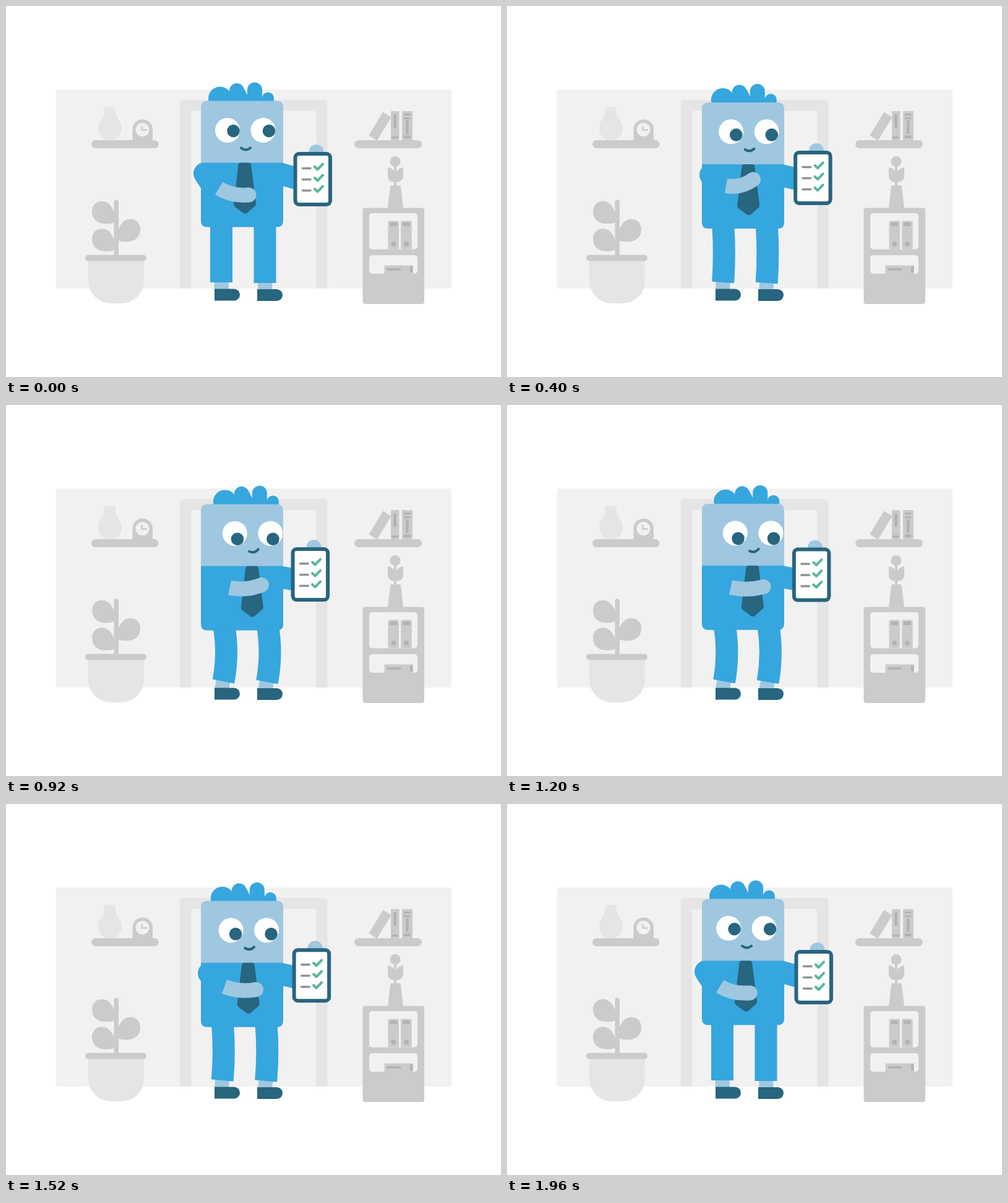
Animation of 800 by 600 pixels, one loop 2000 ms. Source, as an HTML page:

```html
<!DOCTYPE html>
<html lang="en">
<head>
<meta charset="utf-8">
<title>Checklist</title>
<style>
  html, body { margin: 0; width: 100%; height: 100%; overflow: hidden; background: #fff; }
  svg { display: block; width: 800px; height: 600px; }
  .panel { fill: #f1f1f1; }
  .pale { fill: #e5e5e5; }
  .gray { fill: #cbcbcb; }
  .deep { fill: #b3b3b3; }
  .blue { fill: #36a6de; }
  .skin { fill: #9fc7e0; }
  .dark { fill: #28657f; }
  .white { fill: #fff; }
  .line { fill: none; }
  .blue.line { stroke: #36a6de; stroke-width: 36; fill: none; }
  .skin.line { stroke: #9fc7e0; stroke-width: 24; fill: none; }
  .round { stroke-linecap: round; stroke-linejoin: round; }
</style>
</head>
<body>
<svg viewBox="0 0 800 600">
  <!-- room -->
  <rect class="panel" x="80.5" y="135" width="639.5" height="322" rx="4"/>
  <path class="pale" d="M281 457V158q0-6 6-6H513.500q6 0 6 6V457H501.500V175q0-5.500-5.500-5.500H304.500q-5.500 0-5.500 5.500V457Z"/>

  <!-- left shelf -->
  <rect class="gray" x="138" y="217" width="108.500" height="13" rx="6.500"/>
  <path class="pale" d="M158.500 163.500H177V174C178 181 187 186 187 198C187 210 178 217.500 168 217.500S149 210 149 198C149 186 157.500 181 158.500 174Z"/>
  <path class="gray" d="M204.500 217V199.700a16.250 16.250 0 0 1 32.500 0V217Z"/>
  <circle class="panel" cx="220.500" cy="200" r="11"/>
  <path class="line" stroke="#cbcbcb" stroke-width="2.500" d="M219.500 194V200.500H228"/>

  <!-- potted plant -->
  <rect class="gray" x="174.500" y="313.500" width="7.500" height="95" rx="3.500"/>
  <g class="gray">
    <path id="leaf" d="M176.500 349C166 355 139 355 139 332C139 318 152 313 162 317C172 322 177 335 176.500 349Z"/>
    <use href="#leaf" y="44.500"/>
    <use href="#leaf" transform="translate(356 29) scale(-1 1)"/>
  </g>
  <path class="pale" d="M133 410H223V444a37 37 0 0 1-37 37H170a37 37 0 0 1-37-37Z"/>
  <rect class="gray" x="128" y="402.500" width="99" height="10" rx="5"/>

  <!-- right shelf -->
  <g class="gray">
    <rect x="563" y="217" width="109" height="13" rx="6.500"/>
    <path d="M609.500 172L622 180L599.500 217L587 209Z" stroke="#cbcbcb" stroke-linejoin="round"/>
    <rect x="622" y="170" width="13.500" height="47" rx="1"/>
    <rect x="640" y="170" width="17" height="47" rx="1"/>
  </g>
  <g class="deep">
    <rect x="626" y="175" width="5" height="22" rx="2"/>
    <rect x="623" y="211" width="11" height="3.500"/>
    <rect x="643" y="174" width="10.500" height="3"/>
    <rect x="643" y="180" width="10.500" height="3"/>
    <rect x="646" y="185" width="4.500" height="22"/>
    <rect x="643" y="209.500" width="10.500" height="4.500"/>
  </g>

  <!-- cabinet -->
  <g class="gray">
    <circle cx="629" cy="251.500" r="8.500"/>
    <rect x="627" y="255" width="4" height="37"/>
    <path d="M617 261C624 262 628 266 629.500 273C631 266 635 262 642 261V275C642 282 636 285 629.500 285S617 282 617 275Z"/>
    <path d="M623 290H636q1.500 0 2 2L642 327H617L621 292q.500-2 2-2Z"/>
    <rect x="576.500" y="326.500" width="99.500" height="155.500" rx="4"/>
  </g>
  <rect class="panel" x="587" y="335" width="78" height="58.500" rx="5"/>
  <rect class="panel" x="587" y="403" width="78" height="30" rx="5"/>
  <g id="binder">
    <rect class="gray" x="617.500" y="347.500" width="17.500" height="46" rx="2"/>
    <rect class="deep" x="620.500" y="350" width="11.500" height="6" rx="1"/>
    <circle class="deep" cx="626.300" cy="385" r="4"/>
  </g>
  <use href="#binder" x="20.700"/>
  <rect class="gray" x="611.500" y="419.500" width="46.500" height="14"/>
  <rect class="deep" x="616" y="424" width="22" height="4"/>
  <rect class="deep" x="653" y="421" width="4" height="10"/>

  <!-- character -->
  <path id="ankleL" class="skin line" style="stroke-width:23"/>
  <path id="ankleR" class="skin line" style="stroke-width:23"/>
  <path id="legL" class="blue line"/>
  <path id="legR" class="blue line"/>
  <path id="shoe" class="dark" d="M337 457.500H368.500a9.500 9.500 0 0 1 0 19H337Z"/>
  <use href="#shoe" x="69" y=".5"/>

  <path id="armL" class="blue line round"/>
  <path id="armR" class="blue line round"/>
  <g id="hair" class="blue">
    <circle cx="346" cy="149.500" r="19"/>
    <path class="blue line round" style="stroke-width:24" d="M373 137L385 160M402 135.500V158"/>
    <path class="blue line round" style="stroke-width:19" d="M423.500 149V160"/>
    <rect x="345" y="147" width="70" height="14"/>
  </g>
  <g id="body">
    <path class="blue" d="M315 252H448V347.500q0 10-10 10H325q-10 0-10-10Z"/>
    <path class="skin" d="M315 253.500V163.500q0-10 10-10H438q10 0 10 10V253.500Z"/>
  </g>
  <g id="eyes" class="white">
    <circle cx="358" cy="201" r="20"/>
    <circle cx="415.500" cy="201" r="20"/>
  </g>
  <g id="pupils" class="dark">
    <circle cx="367.500" cy="202" r="10.300"/>
    <circle cx="425" cy="202" r="10.300"/>
  </g>
  <path id="smile" class="line round" stroke="#28657f" stroke-width="4" d="M-7.500-1.500Q0 4.500 7.500-1.500"/>
  <path id="tie" class="dark" d="M379.500 253.500H392.500q3 0 3.500 3L404 319q.500 3-2 5L390 334.500q-3.500 2.500-7 0L370 325q-2.500-2-2-5L375.500 256.500q.500-3 4-3Z"/>
  <path id="forearm" class="skin line"/>
  <circle id="hand" class="skin" r="12"/>

  <g id="board">
    <circle class="skin" cx="501.500" cy="236" r="12"/>
    <rect class="white" x="467.500" y="239" width="56.500" height="82" rx="6" stroke="#28657f" stroke-width="6"/>
    <g id="item" class="line round">
      <path stroke="#8f9294" stroke-width="3.500" d="M479.500 262.500H492"/>
      <path stroke="#54b79b" stroke-width="4" d="M499 260L503.500 264.300L512 255.500"/>
    </g>
    <use href="#item" y="18"/>
    <use href="#item" y="36"/>
  </g>
</svg>
<script>
const LOOP = 2000, STEP = 40;
const el = id => document.getElementById(id);
const draw = (id, d) => el(id).setAttribute('d', d);
const move = (id, x, y, turn = 0) =>
  el(id).setAttribute('transform', `translate(${x} ${y}) rotate(${turn})`);

// time, cuff x y, bend x y, hand x y, shoulder x
const armKeys = [
  [0, 344, 295, 366, 308, 392.5, 305.5, 321],
  [400, 354, 291, 378, 295, 398, 280.5, 329],
  [600, 359, 289.5, 384, 291.5, 407.5, 282.5, 332],
  [920, 361.5, 295.5, 388, 301, 413, 291, 336],
  [1200, 361.5, 295, 388, 301, 414.5, 294, 336],
  [1520, 353, 295.5, 378, 305, 404, 300, 328],
];
armKeys.push([LOOP, ...armKeys[0].slice(1)]);

// slope of one channel at a key; the arm rests at the loop ends
function slope(i, c) {
  const a = armKeys[i - 1], b = armKeys[i + 1];
  return a && b ? (b[c] - a[c]) / (b[0] - a[0]) : 0;
}

function armAt(t) {
  const i = armKeys.findIndex(k => k[0] > t) - 1;
  const a = armKeys[i], b = armKeys[i + 1], span = b[0] - a[0];
  const u = (t - a[0]) / span, v = 1 - u;
  return a.slice(1).map((from, n) => {
    const c = n + 1;
    return from * v * v * (1 + 2 * u) + b[c] * u * u * (3 - 2 * u)
      + span * u * v * (slope(i, c) * v - slope(i + 1, c) * u);
  });
}

function leg(side, x, y, p) {
  const top = x + 4 * p, end = x + 3.5 * p;
  draw('leg' + side, `M${top} 345L${top} 355Q${x + 12.5 * p} 401 ${end} ${y}`);
  draw('ankle' + side, `M${end} ${y - 3}L${x + .5} 460`);
}

function render(t) {
  const p = (1 - Math.cos(2 * Math.PI * t / LOOP)) / 2;
  const look = p ** .8, y = 7 * p;
  move('body', 0, y);
  move('hair', 8 * p, y);
  move('eyes', 12 * p, 6.8 * p);
  move('pupils', 6.5 * look, 15 * look);
  move('smile', 387.5 + 13.5 * p, 231 + 5.5 * p, -14 * p);
  move('tie', 12 * p, y);
  move('board', -4 * p, -6 * p);
  leg('L', 348, 447, p);
  leg('R', 418.5, 448, p);

  const [cx, cy, bx, by, hx, hy, sx] = armAt(t);
  draw('forearm', `M${cx} ${cy}Q${bx} ${by} ${hx} ${hy}`);
  move('hand', hx, hy);
  draw('armL', `M${sx} ${271 + 6 * p}L${cx - 4} ${cy + 5}`);
  draw('armR', `M${442 - p} ${271 + y}L470 ${279 + 4 * p}`);
}

function tick() {
  render(Math.floor(performance.now() % LOOP / STEP) * STEP);
  requestAnimationFrame(tick);
}
tick();
</script>
</body>
</html>
```
